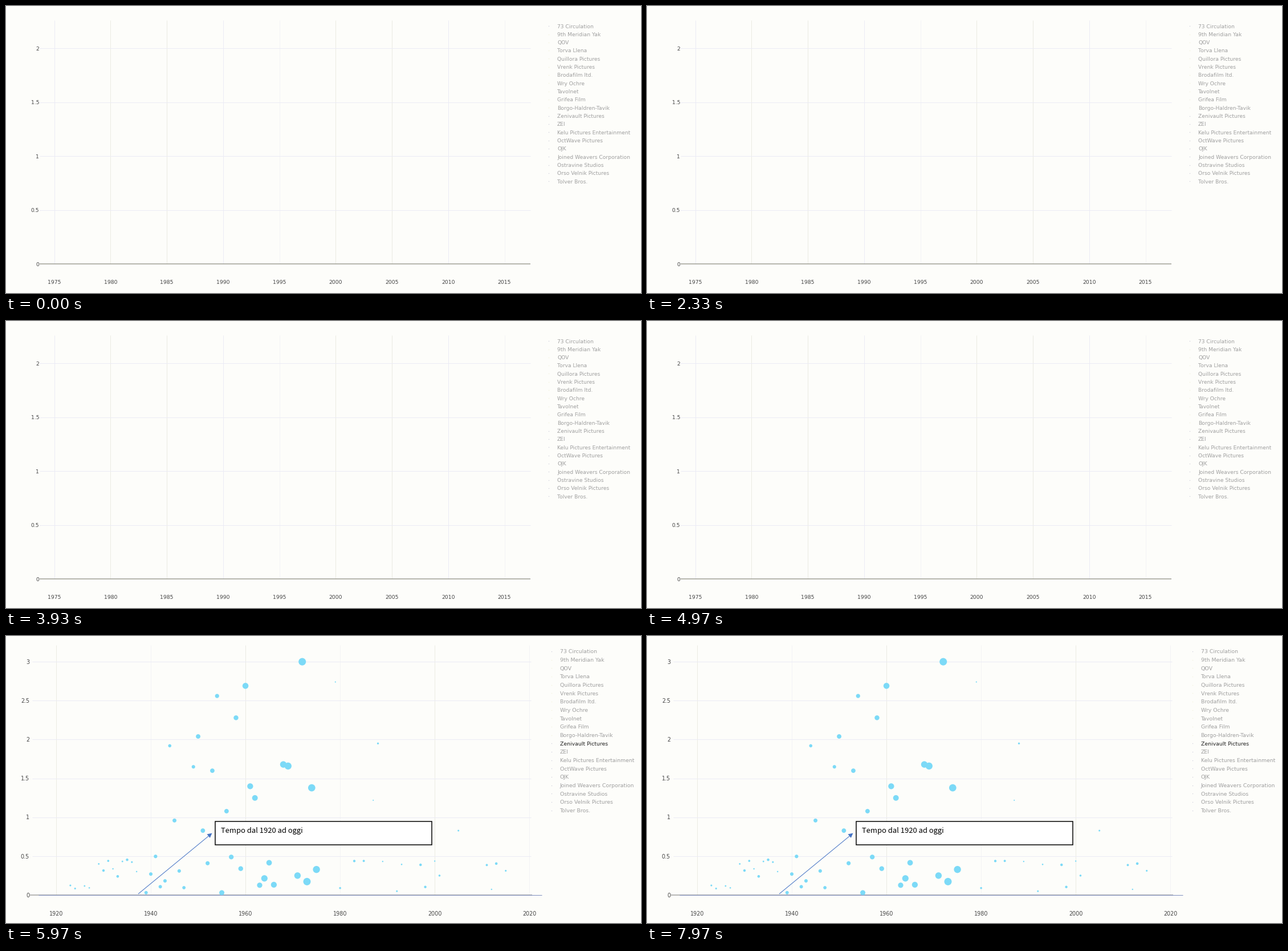
Recreate the animation shown at these times as a matplotlib script. Size 1114 by 503 pixels, loop 8000 ms.

```python
import random

import matplotlib.pyplot as plt
from matplotlib.animation import FuncAnimation
from matplotlib.patches import Polygon, Rectangle

W, H, DPI = 1114, 503, 72      # at 72 dpi one point is one pixel
INTERVAL, FRAMES = 40, 200
CUT_MS = 5030                  # hard cut between the two charts

PAPER, INK, GREY = "#fdfdfa", "#444444", "#a0a0a0"
LILAC, SAND, FAINT = "#ebebf5", "#ebebe3", "#f3f3f5"
BLUE, CYAN = "#4472c4", "#7cdaf7"

STUDIOS = [
    "73 Circulation", "9th Meridian Yak", "QOV", "Torva Llena",
    "Quillora Pictures", "Vrenk Pictures", "Brodafilm ltd.", "Wry Ochre",
    "Tavolnet", "Grifea Film", "Borgo-Haldren-Tavik", "Zenivault Pictures",
    "ZEI", "Kelu Pictures Entertainment", "OctWave Pictures", "OJK",
    "Joined Weavers Corporation", "Ostravine Studios",
    "Orso Velnik Pictures", "Tolver Bros.",
]
SELECTED = 11

# Years that stand out from the low scatter of the others.
PEAKS = {1944: 1.92, 1945: 0.96, 1949: 1.65, 1950: 2.04, 1951: 0.83,
         1953: 1.6, 1954: 2.56, 1956: 1.08, 1958: 2.28, 1960: 2.69,
         1961: 1.4, 1962: 1.25, 1968: 1.68, 1969: 1.66, 1972: 3,
         1974: 1.38, 1979: 2.74, 1987: 1.22, 1988: 1.95, 2005: 0.83}

fig = plt.figure(figsize=((W + 0.01) / DPI, (H + 0.01) / DPI), dpi=DPI,
                 facecolor=PAPER)
ax = fig.add_axes([0, 0, 1, 1])
ax.set(xlim=(0, W), ylim=(H, 0))
ax.axis("off")


def line(xs, ys, color, width=1, z=1):
    return ax.plot(xs, ys, color=color, lw=width, zorder=z,
                   solid_capstyle="butt")[0]


def label(x, y, text, size, color=INK, align="left"):
    """Text whose capitals are centred on y."""
    return ax.text(x, y + 0.365 * size, text, fontsize=size, color=color,
                   ha=align, va="baseline", family="DejaVu Sans")


def grid(x_ticks, y_ticks, left, right, top, base, label_x, label_y, size):
    """Ticks are (value, position, colour)."""
    parts = [label(label_x, base, "0", size, align="right")]
    for value, x, color in x_ticks:
        parts += [line([x, x], [top, base], color),
                  label(x, label_y, str(value), size, align="center")]
    for value, y, color in y_ticks:
        parts += [line([left, right], [y, y], color),
                  label(label_x, y, f"{value:g}", size, align="right")]
    return parts


def legend(x, y, step, size, selected=None):
    parts = []
    for i, name in enumerate(STUDIOS):
        row = y + i * step
        color = "#222222" if i == selected else GREY
        dot = "#f4f4dc" if 1 <= i <= 10 else "#cfcfdc"
        parts += [label(x, row, name, size, color),
                  ax.scatter([x - 15], [row], s=2, color=dot, lw=0)]
    return parts


def empty_chart():
    colors = [LILAC, SAND, SAND, LILAC, FAINT, SAND, SAND, LILAC, FAINT]
    x_ticks = [(1975 + 5 * i, 84.5 + 98.75 * i, color)
               for i, color in enumerate(colors)]
    y_ticks = [(v / 2, 452.5 - 94.5 * v, LILAC) for v in range(1, 5)]
    parts = grid(x_ticks, y_ticks, 59, 920, 25, 452.5, 58, 484, 9.3)
    parts.append(line([59, 920], [452.5, 452.5], "#a5a59c", 1.6))
    return parts + legend(967, 35.2, 14.32, 9.07)


def radius(year, rng):
    """Bubbles grow through the middle decades and are small elsewhere."""
    if 1938 <= year <= 1975:
        return max(3.2, 3 + 0.11 * (year - 1944)) + rng.uniform(-0.5, 0.5)
    return rng.uniform(1, 2.4)


def bubbles():
    rng = random.Random(4)
    xs, ys, areas = [], [], []
    for year in range(1923, 2016):
        chance = 0.75 if year < 1995 else 0.4
        value, shown = rng.uniform(0.01, 0.5), rng.random() < chance
        r = radius(year, rng)
        if shown or year in PEAKS:
            xs.append(88 + 8.302 * (year - 1920))
            ys.append(454.3 - 136.4 * PEAKS.get(year, value))
            areas.append((2 * r) ** 2)
    return ax.scatter(xs, ys, s=areas, color=CYAN, lw=0, zorder=3)


def callout():
    box = ax.add_patch(Rectangle((367, 325), 380, 41, fc="white",
                                 ec="black", lw=1.5, zorder=5))
    text = ax.text(377, 345, "Tempo dal 1920 ad oggi", fontsize=13,
                   family="Noto Sans CJK JP", color="black",
                   va="baseline", zorder=6)
    shaft = line([232, 357], [452, 349.3], BLUE, z=5)
    head = ax.add_patch(Polygon([(361.5, 345.5), (357.8, 353.8),
                                 (352.5, 347.4)], fc=BLUE, lw=0, zorder=5))
    return [box, text, shaft, head]


def bubble_chart():
    x_ticks = [(1920 + 20 * i, 88 + 166.04 * i, FAINT if i % 2 else SAND)
               for i in range(6)]
    y_ticks = [(v / 2, 454.3 - 68.2 * v, LILAC) for v in range(1, 7)]
    parts = grid(x_ticks, y_ticks, 46, 921, 16, 454.3, 41, 486.5, 9.6)
    parts += [line([42, 923], [454.3, 454.3], "#a0a0a0", 1.5),
              line([57, 940], [453.6, 453.6], "#7f8fbe", z=4), bubbles()]
    return parts + callout() + legend(971.5, 27, 14.66, 9.4, SELECTED)


before, after = empty_chart(), bubble_chart()


def update(frame):
    late = frame * INTERVAL >= CUT_MS
    for part in before:
        part.set_visible(not late)
    for part in after:
        part.set_visible(late)
    return before + after


anim = FuncAnimation(fig, update, frames=FRAMES, interval=INTERVAL,
                     repeat=True, repeat_delay=0, blit=False)
plt.show()
```
